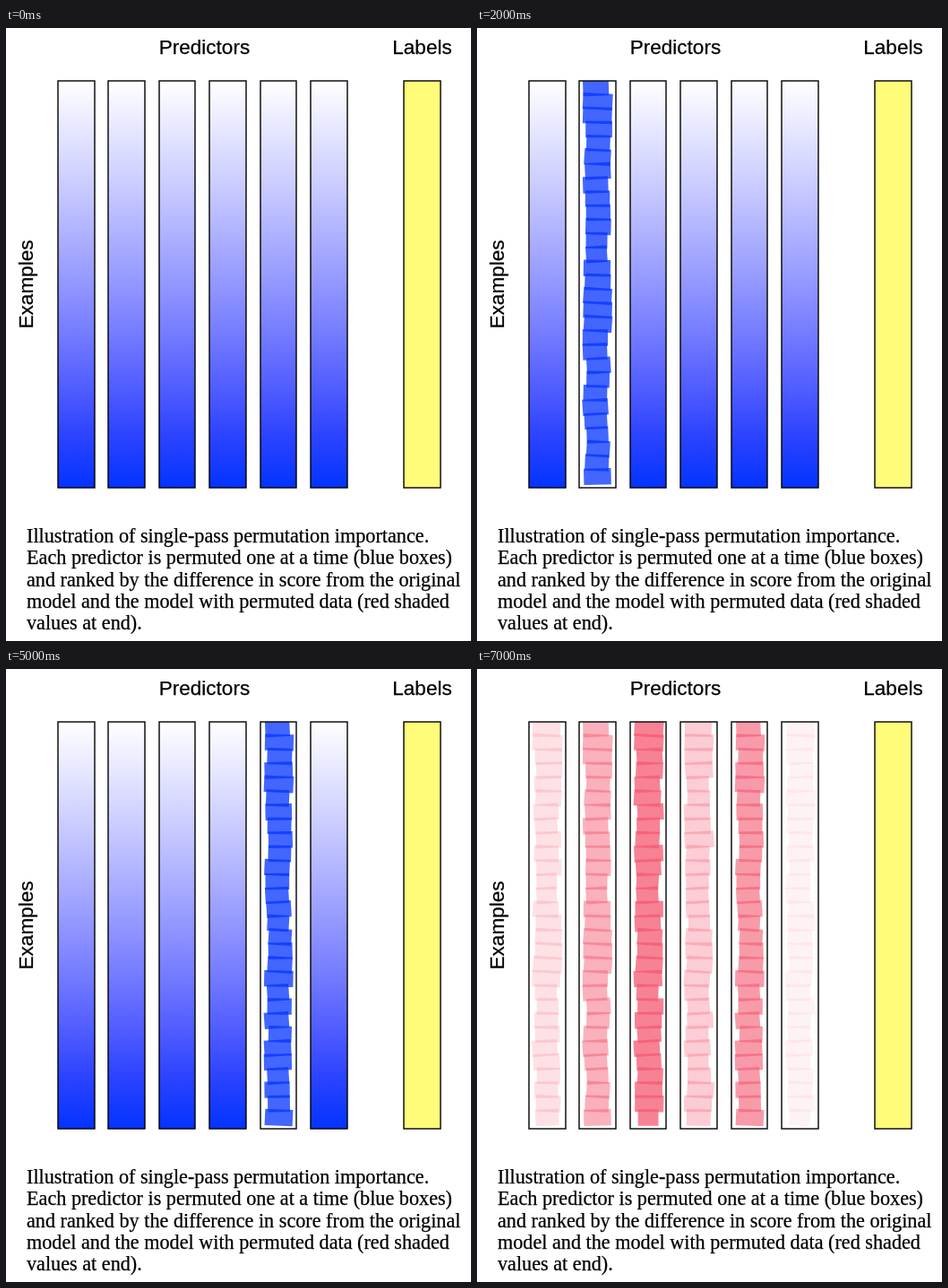
Write an HTML page that moves like this. It is 519x684 px and loops after 8000 ms.

```html
<!DOCTYPE html>
<html lang="en">
<head>
<meta charset="utf-8">
<title>Single-pass permutation importance</title>
<style>
  html, body { margin: 0; width: 100%; height: 100%; overflow: hidden; background: #fff; }
  svg { display: block; width: 519px; height: 684px; }
  text { stroke: #000; stroke-width: .25; }
  .heading { font: 22.5px "Liberation Sans", Arial, sans-serif; text-anchor: middle; }
  .caption { font: 22.2px "Liberation Serif", "Times New Roman", serif; }
  .frame { fill: none; stroke: #000; stroke-width: 1.4; }
  .step { opacity: 0; animation: shown 8s step-end infinite; }
  @keyframes shown {
    0% { opacity: 1; }
    12.5%, 100% { opacity: 0; }
  }
</style>
</head>
<body>
<svg id="stage" viewBox="0 0 519 684">
  <defs>
    <linearGradient id="shade" x1="0" y1="0" x2="0" y2="1"></linearGradient>
    <clipPath id="rows"><rect x="0" y="59" width="519" height="454"/></clipPath>
  </defs>
  <text class="heading" x="221.5" y="29">Predictors</text>
  <text class="heading" x="464.5" y="29">Labels</text>
  <text class="heading" transform="translate(29.5 286) rotate(-90)">Examples</text>
  <g class="caption">
    <text x="23" y="574">Illustration of single-pass permutation importance.</text>
    <text x="23" y="598.3">Each predictor is permuted one at a time (blue boxes)</text>
    <text x="23" y="622.6">and ranked by the difference in score from the original</text>
    <text x="23" y="647">model and the model with permuted data (red shaded</text>
    <text x="23" y="671.3">values at end).</text>
  </g>
</svg>
<script>
const stage = document.getElementById('stage');
const TOP = 59, HEIGHT = 454, ROWS = 29, PITCH = 15.5, STOPS = 8;
const BLUE = '#0433ff', RED = '#f45870';
const scores = [.24, .62, 1, .4, .8, .1];

function add(parent, tag, attrs) {
  const node = document.createElementNS('http://www.w3.org/2000/svg', tag);
  for (const key in attrs) node.setAttribute(key, attrs[key]);
  return parent.appendChild(node);
}

function box(parent, [x, right], attrs) {
  return add(parent, 'rect', { x, y: TOP, width: right - x, height: HEIGHT, ...attrs });
}

// Left and right edges of a predictor column, snapped to whole pixels.
const edges = index => [58, 98.6].map(x => Math.round(x + index * 56.4));

function step(second) {
  const group = add(stage, 'g', { class: 'step', 'clip-path': 'url(#rows)' });
  group.style.animationDelay = `${second - 8}s`;
  return group;
}

// Seeded random numbers from -1 to 1.
function randomFrom(seed) {
  return () => {
    seed = (seed * 16807) % 2147483647;
    return seed / 1073741823.5 - 1;
  };
}

// The same column gets the same shuffle in every colour.
function permuted(parent, index, fill, opacity) {
  const random = randomFrom(7919 * (index + 1));
  const [x, right] = edges(index);
  box(parent, [x, right], { fill: '#fff' });
  for (let row = 0; row < ROWS; row++) {
    const start = x + 6.3 + random() * 2.7;
    const end = x + 34.3 + random() * 3.2;
    const middle = 66.5 + row * PITCH;
    add(parent, 'rect', {
      x: start, y: middle - 9.2, width: end - start, height: 18.4, fill, 'fill-opacity': opacity,
      transform: `rotate(${random() * 4} ${(start + end) / 2} ${middle})`
    });
  }
}

// White to blue, mixed with a gamma of 1.8 and shown as sRGB.
function mix(amount) {
  const white = (1 - amount) ** 1.8;
  const channel = blue => {
    const light = white + (1 - white) * blue;
    return Math.round(255 * (light < .0031 ? 12.92 * light : 1.055 * light ** (1 / 2.4) - .055));
  };
  return `rgb(${channel(.001)}, ${channel(.033)}, 255)`;
}

for (let i = 0; i <= STOPS; i++) {
  add(document.getElementById('shade'), 'stop', { offset: i / STOPS, 'stop-color': mix(i / STOPS) });
}

const ranking = step(7);
scores.forEach((score, i) => {
  box(stage, edges(i), { fill: 'url(#shade)' });
  permuted(step(i + 1), i, BLUE, .75);
  permuted(ranking, i, RED, .75 * score);
});
stage.append(ranking);
scores.forEach((_, i) => box(stage, edges(i), { class: 'frame' }));
box(stage, [444, 485], { fill: '#fffc79' });
box(stage, [444, 485], { class: 'frame' });
</script>
</body>
</html>
```
